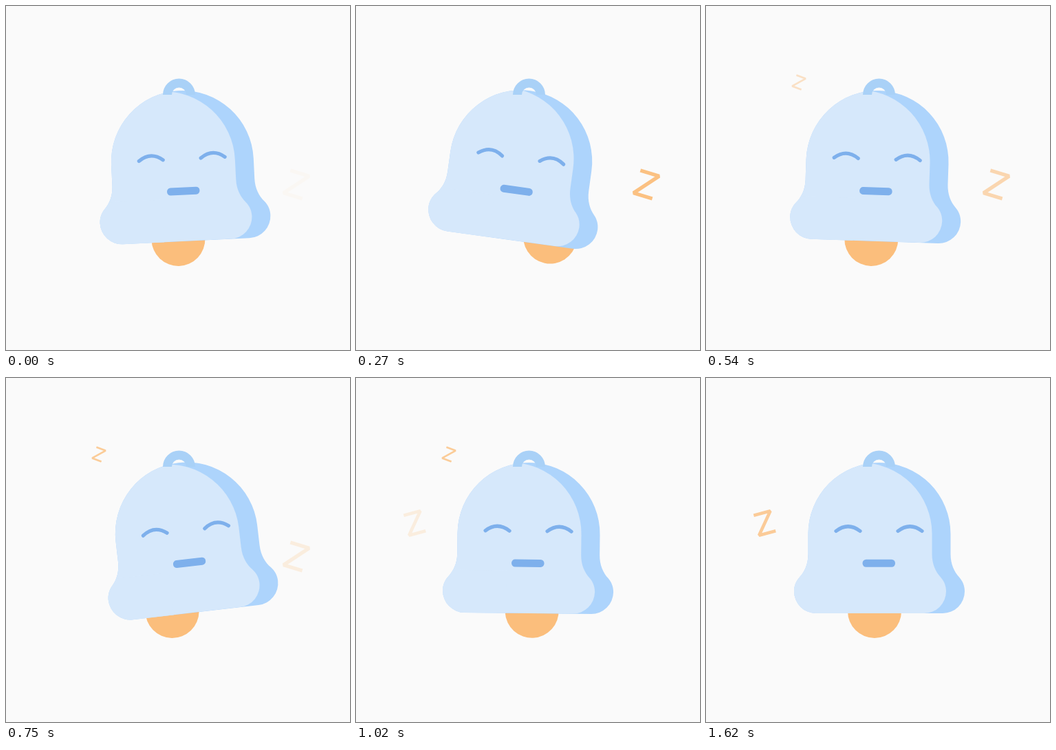
Recreate the animation shown at these times as an HTML page with a canvas. Size 500 by 500 pixels, loop 1.65 s.

```html
<!DOCTYPE html>
<html lang="en">
<head>
<meta charset="utf-8">
<title>Sleeping bell</title>
<style>
html, body { margin: 0; width: 100%; height: 100%; overflow: hidden; background: #fafafa; }
canvas { display: block; width: 500px; height: 500px; }
</style>
</head>
<body>
<canvas id="stage" width="500" height="500"></canvas>
<script>
const ctx = document.getElementById('stage').getContext('2d');
const STEP = 30, LOOP = 1650;
const COLOR = {
  back: '#fafafa', light: '#d6e8fb', shade: '#add4fc',
  ring: '#a9d1f7', face: '#7eb0ec', orange: '#fbbe7c'
};
const PIVOT_Y = 137, SHADE_WIDTH = 27, FADE = 600;

const ZEDS = [
  { x: 422, y: 259.5, size: 28.5, angle: 17, peak: 300 },
  { x: 135, y: 111, size: 14.3, angle: 21, peak: 900 },
  { x: 85.3, y: 211, size: 25, angle: -15, peak: 1500 }
];

const bell = new Path2D(`M148.5 226.5 A103.5 103.5 0 0 1 355.5 226.5 V256
  C355.5 271 361 282 368 289.5 C373 295 376 302 376 310
  A32 32 0 0 1 344 342 H160 A32 32 0 0 1 128 310
  C128 302 131 295 136 289.5 C143 282 148.5 271 148.5 256 Z`);
const ring = new Path2D(`M228 129 A23.5 23.5 0 0 1 275 129 H262
  A10.5 10.5 0 0 0 241 129 Z`);
const clapper = new Path2D('M206 339 A39 39 0 0 0 284 339 Z');
const eyes = new Path2D('M189 222.5 Q206.5 209 224 222.5 M279 222.5 Q296.5 209 314 222.5');

const clamp = value => Math.max(0, Math.min(1, value));

// A fading sine that starts slowly, quickens and slows down again.
function swing(time, amplitude, halfTurns, duration) {
  const u = clamp((time + STEP) / duration);
  const pace = 0.2 * u + 0.8 * u * u * (3 - 2 * u);
  return -amplitude * (1 - u) * Math.sin(Math.PI * halfTurns * pace);
}

function rotated(x, y, degrees, paint) {
  ctx.save();
  ctx.translate(x, y);
  ctx.rotate(degrees * Math.PI / 180);
  ctx.translate(-x, -y);
  paint();
  ctx.restore();
}

function fill(path, color) {
  ctx.fillStyle = color;
  ctx.fill(path);
}

function paintBell() {
  fill(bell, COLOR.shade);
  ctx.save();
  ctx.clip(bell);
  ctx.translate(-SHADE_WIDTH, 0);
  fill(bell, COLOR.light);
  // The light side reaches the left edge of the bell.
  ctx.translate(SHADE_WIDTH, 0);
  ctx.fillRect(120, 280, 100, 70);
  ctx.restore();

  ctx.strokeStyle = ctx.fillStyle = COLOR.face;
  ctx.lineWidth = 5.2;
  ctx.lineCap = 'round';
  ctx.stroke(eyes);
  ctx.fillStyle = COLOR.face;
  ctx.beginPath();
  ctx.roundRect(227.5, 263.7, 47.5, 11, 5.2);
  ctx.fill();
}

function paintZed({ x, y, size, angle, peak }, time) {
  const rise = Math.min(peak, FADE);
  const age = time + STEP / 2 - peak;
  const w = size / 2, h = size * 0.6;
  ctx.globalAlpha = clamp(1 + (age < 0 ? age / rise : -age / FADE));
  ctx.strokeStyle = COLOR.orange;
  ctx.lineWidth = size * 0.185;
  ctx.lineCap = 'butt';
  ctx.lineJoin = 'bevel';
  rotated(x, y, angle, () => {
    ctx.beginPath();
    ctx.moveTo(x - w, y - h);
    ctx.lineTo(x + w, y - h);
    ctx.lineTo(x - w, y + h);
    ctx.lineTo(x + w, y + h);
    ctx.stroke();
  });
  ctx.globalAlpha = 1;
}

function draw() {
  const time = Math.floor(performance.now() % LOOP / STEP) * STEP;
  ctx.fillStyle = COLOR.back;
  ctx.fillRect(0, 0, 500, 500);
  rotated(245, PIVOT_Y, swing(time, 18, 5, 1350), () => fill(clapper, COLOR.orange));
  rotated(252, PIVOT_Y, swing(time, 22, 6, 1125), paintBell);
  fill(ring, COLOR.ring);
  ZEDS.forEach(zed => paintZed(zed, time));
  requestAnimationFrame(draw);
}
draw();
</script>
</body>
</html>
```
